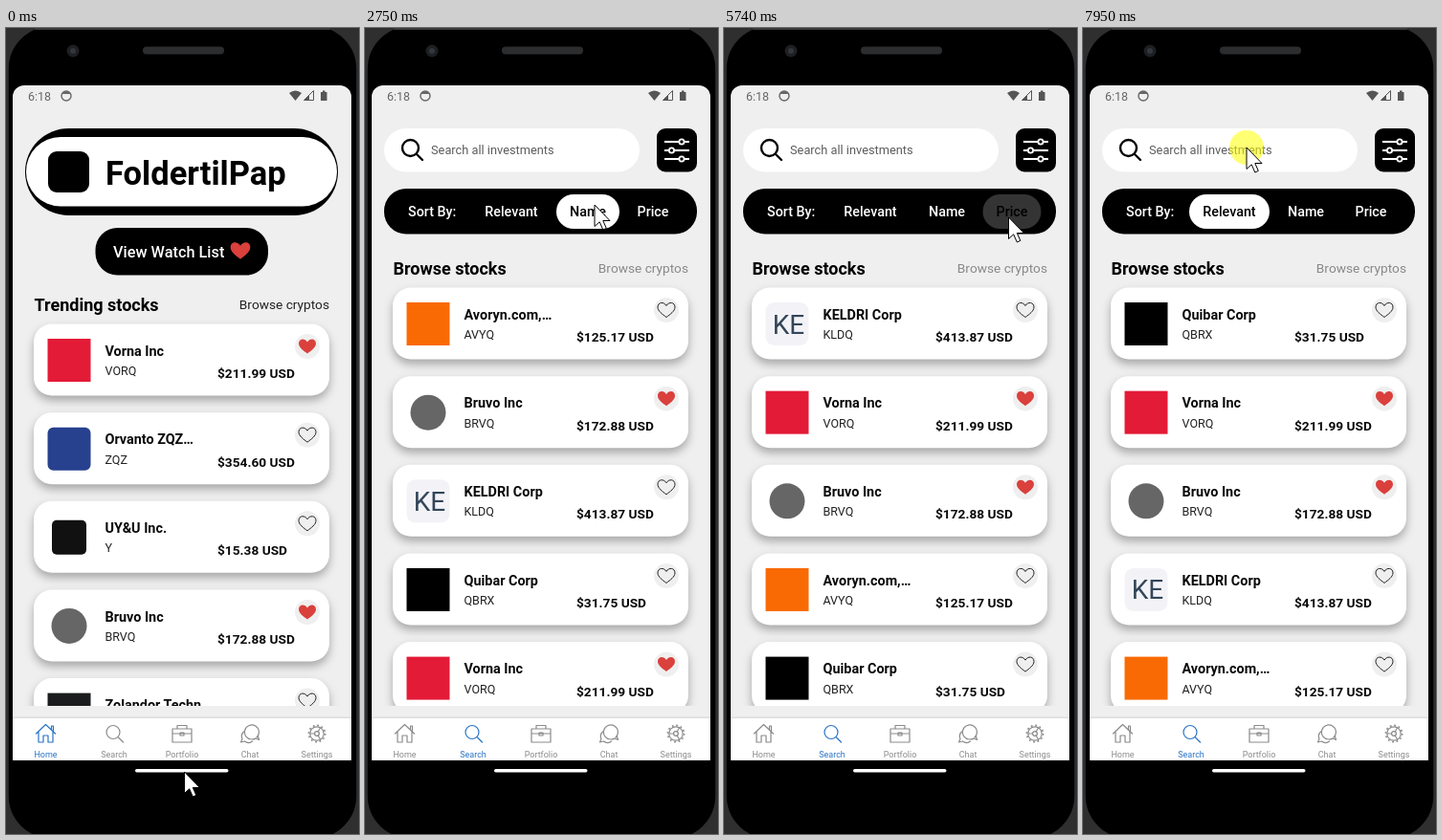
An HTML page that plays this animation: 369 by 843 pixels, repeating every 8000 ms.

```html
<!DOCTYPE html>
<html lang="en">
<head>
<meta charset="utf-8">
<title>Stock browser</title>
<style>
  html, body { margin: 0; width: 100%; height: 100%; overflow: hidden; background: #000; }
  svg { display: block; width: 369px; height: 843px; font-family: Roboto, sans-serif; }
  .card { filter: drop-shadow(0 5px 5px rgba(0, 0, 0, .3)); }
  .line { fill: none; stroke: currentColor; stroke-width: 1.2; stroke-linejoin: round; stroke-linecap: round; }
  .tab { color: #8b8b8b; }
  .tab.active { color: #2b74c6; }
  .tab text { fill: currentColor; }
</style>
</head>
<body>
<svg id="stage" viewBox="0 0 369 843"></svg>
<script>
const LOOP = 8000;
const CARD_STEP = 92.65;

const text = (x, y, size, weight, fill, value, anchor = 'start') =>
  `<text x="${x}" y="${y}" font-size="${size}" font-weight="${weight}" fill="${fill}" text-anchor="${anchor}">${value}</text>`;
const box = (x, y, w, h, r, fill, extra = '') =>
  `<rect x="${x}" y="${y}" width="${w}" height="${h}" rx="${r}" fill="${fill}" ${extra}/>`;
const circle = (x, y, r, fill, extra = '') =>
  `<circle cx="${x}" cy="${y}" r="${r}" fill="${fill}" ${extra}/>`;
const line = d => `<path class="line" d="${d}"/>`;
const heart = (x, y, liked, scale = 1) =>
  `<path transform="translate(${x} ${y}) scale(${scale})" fill="${liked ? '#da403c' : 'none'}"
    stroke="${liked ? 'none' : '#222'}" d="M0 7.5C-4 4.5-9 1-9-3C-9-8.5-2.5-9 0-4.5C2.5-9 9-8.5 9-3C9 1 4 4.5 0 7.5Z"/>`;

// Logo stand-ins, drawn relative to the card's corner
const square = (fill, r = 0) => box(14.5, 15.5, 45, 45, r, fill);
const initials = value => square('#f3f3f7', 9) + text(38.5, 48, 28, 400, '#33465a', value, 'middle');

const vorna = { name: 'Vorna Inc', ticker: 'VORQ', price: 211.99, liked: true, logo: square('#e31b37') };
const bruvo = { name: 'Bruvo Inc', ticker: 'BRVQ', price: 172.88, liked: true, logo: circle(37, 38, 18.5, '#666') };
const trending = [
  vorna,
  { name: 'Orvanto ZQZ…', ticker: 'ZQZ', price: 354.6, logo: square('#27418f', 6) },
  { name: 'UY&amp;U Inc.', ticker: 'Y', price: 15.38, logo: box(19, 20, 36, 36, 5, '#111') },
  bruvo,
  { name: 'Zolandor Techn', ticker: '', price: 14.2, logo: square('#1a1c1d') },
];
const stocks = [
  { name: 'Quibar Corp', ticker: 'QBRX', price: 31.75, logo: square('#000') },
  vorna,
  bruvo,
  { name: 'KELDRI Corp', ticker: 'KLDQ', price: 413.87, logo: initials('KE') },
  { name: 'Avoryn.com,…', ticker: 'AVYQ', price: 125.17, logo: square('#f96a04') },
];

const card = (stock, y) => `<g class="card" transform="translate(29 ${y})">
  ${box(0, 0, 309, 75, 19, '#fff')}${stock.logo}
  ${text(74.5, 33.2, 14.4, 700, '#0a0a0a', stock.name)}
  ${text(74.5, 53.5, 12.5, 400, '#222', stock.ticker)}
  ${text(192, 56.5, 13.7, 700, '#0a0a0a', `$${stock.price.toFixed(2)} USD`)}
  ${circle(286, 23.5, 13, '#efefef')}${heart(286, 23.5, stock.liked)}</g>`;
const list = (items, top) => items.map((item, i) => card(item, top + i * CARD_STEP)).join('');

const byName = (a, b) => a.name.localeCompare(b.name);
const byPrice = (a, b) => a.price - b.price;
const nameUp = [...stocks].sort(byName);
const priceUp = [...stocks].sort(byPrice);

const sortTabs = [
  { label: 'Relevant', x: 111, w: 84 },
  { label: 'Name', x: 200, w: 66 },
  { label: 'Price', x: 270.5, w: 61 },
];
const clicks = [
  { down: 600, up: 740 },
  { down: 2290, up: 2440, dim: 2310, swap: 2530, tab: 1, order: nameUp },
  { down: 3160, up: 3310, dim: 3180, swap: 3390, tab: 1, order: [...nameUp].reverse() },
  { down: 4450, up: 4590, dim: 4480, swap: 4730, tab: 2, order: priceUp },
  { down: 5470, up: 5640, dim: 5490, swap: 5730, tab: 2, order: [...priceUp].reverse() },
  { down: 6980, up: 7260, dim: 7080, swap: 7330, tab: 0, order: stocks },
];
const sorts = clicks.filter(click => click.order);
const SEARCH_OPENS = 800;

// Pointer path: time, x, y
const pointer = [
  [30, 186.5, 778], [100, 166, 768], [190, 130, 747], [270, 117, 740],
  [1100, 117, 740], [1250, 127, 680], [1450, 180, 420], [1640, 215, 265], [1760, 234, 205], [1880, 240, 185],
  [3850, 240, 185], [3960, 259, 190], [4110, 288, 196], [4220, 297.5, 198],
  [6440, 297.5, 198], [6590, 228.5, 198], [6720, 182, 198], [6940, 157, 196],
  [7380, 157, 196], [7520, 166, 155], [7660, 171, 125],
];

const navTabs = [
  ['Home', 41.5, line('M-10 0L0-9.5L10 0M-7.5-2V9H-2.5V2H2.5V9H7.5V-2M6-4V-8H8V-2')],
  ['Search', 113, line('M6-1.5A7 7 0 1 1-8-1.5A7 7 0 1 1 6-1.5M4 3.5L9.5 9')],
  ['Portfolio', 184, line('M-10-5H10V9H-10ZM-5-5V-8.5H5V-5M-10 0H10M-2-1H2V2H-2Z')],
  ['Chat', 255, line('M7 4A7.5 7.5 0 1 0 2 6Q5 6 6 5L9.5 6.5L8.5 3M-6.5-2A6.5 6.5 0 0 0-8 5.5L-9.5 9L-5.5 8A6.5 6.5 0 0 0 2.5 8')],
  ['Settings', 325, `<circle class="line" r="7.2"/><circle class="line" r="2.4"/>
    <circle r="8.6" fill="none" stroke="currentColor" stroke-width="1.6" stroke-dasharray="1.8 2.7"/>${line('M-7 0H-2.4M1.2-2L3.6-6.2M1.2 2L3.6 6.2')}`],
];

const phone = `
  <rect width="369" height="843" fill="#2f2f30"/>
  <rect x="1.5" y="-3" width="366" height="852" rx="46" fill="#000" stroke="#2d2f31" stroke-width="2.500"/>
  <path d="M30 1H339" stroke="#37393b" stroke-width="2"/>
  ${circle(70, 24, 6.5, '#1d1f22')}${circle(70, 24, 3, '#33373d')}
  ${box(143, 19.5, 85, 8, 4, '#2c2d2f')}
  <path d="M7 766V72A12 12 0 0 1 19 60H349A12 12 0 0 1 361 72V766Z" fill="#efefef"/>
  ${text(23, 75.5, 12.5, 400, '#666', '6:18')}
  ${circle(63, 71, 5, 'none', 'stroke="#666" stroke-width="1.4"')}
  <path d="M58.5 69A5 5 0 0 1 67.5 69Z" fill="#666"/>
  <path d="M296 68Q302.500 63 309 68L302.500 76Z" fill="#555"/>
  <path d="M311.500 75.500L321.500 65.500V75.500Z" fill="none" stroke="#555"/>
  <path d="M311.500 75.500L317 70V75.500Z" fill="#555"/>
  <path d="M329 67H331V65.500H333.500V67H335.500V76H329Z" fill="#555"/>`;

const homePage = `<g id="home">
  ${box(20, 105, 327, 91, 45.5, '#000')}${box(21, 114, 325, 72.5, 36, '#fff')}
  ${box(44, 129, 43, 43, 9, '#000')}
  ${text(104, 164, 34.5, 700, '#000', 'FoldertilPap')}
  ${box(93.5, 209, 180.5, 49.5, 23, '#000')}
  ${text(112, 240, 16.3, 500, '#fff', 'View Watch List')}${heart(245, 233, true, 1.15)}
  ${text(29.5, 296, 18, 700, '#000', 'Trending stocks')}
  ${text(338, 294, 13.7, 400, '#222', 'Browse cryptos', 'end')}
  <g clip-path="url(#listArea)">${list(trending, 309.5)}</g></g>`;

const knobs = [[331, 119], [320.5, 128], [331, 137]].map(([x, y]) =>
  `<path d="M313 ${y}H339" stroke="#fff" stroke-width="2.1"/>${circle(x, y, 2.6, '#000', 'stroke="#fff" stroke-width="1.8"')}`).join('');

const searchPage = `<g id="search">
  ${box(20, 105, 267, 45.5, 22.7, '#fff')}
  <g fill="none" stroke="#000" stroke-width="2.4" stroke-linecap="round"><circle cx="47.500" cy="125.500" r="8.500"/><path d="M54 132L60 138"/></g>
  ${text(69, 132.3, 12.8, 400, '#5c5c5c', 'Search all investments')}
  ${box(305, 105, 42, 45.5, 9, '#000')}${knobs}
  ${box(20, 168, 327, 47.5, 23, '#000')}
  ${text(45, 197, 14.3, 500, '#fff', 'Sort By:')}
  ${sortTabs.map(({ label, x, w }) => `<g class="sort">${box(x, 174, w, 36, 18, '#fff')}
    ${text(x + w / 2, 197, 14.3, 500, '#fff', label, 'middle')}</g>`).join('')}
  ${text(29.5, 258, 18, 700, '#000', 'Browse stocks')}
  ${text(338, 256, 13.7, 400, '#888', 'Browse cryptos', 'end')}
  <g id="results" clip-path="url(#listArea)"></g></g>`;

const navBar = `
  ${box(7, 720.5, 354, 1.5, 0, '#dedede')}${box(7, 722, 354, 44, 0, '#fff')}
  ${navTabs.map(([label, x, icon]) => `<g class="tab"><g transform="translate(${x} 738)">${icon}</g>
    <text x="${x}" y="763" font-size="9" text-anchor="middle">${label}</text></g>`).join('')}
  ${box(135, 775, 97.5, 3.5, 1.7, '#fff')}`;

const stage = document.getElementById('stage');
stage.innerHTML = `<clipPath id="listArea"><rect x="7" y="200" width="354" height="509"/></clipPath>
  ${phone}${homePage}${searchPage}${navBar}
  <g id="pointer">${circle(0, 0, 18, '#ff0', 'id="halo" fill-opacity=".55"')}
  <path d="M0 0V22.500L5.200 17.800L8.800 26L12.300 24.400L8.800 16.500H16Z" fill="#fff" stroke="#000"/></g>`;

const [home, search, results, pointerNode, halo] =
  ['home', 'search', 'results', 'pointer', 'halo'].map(id => document.getElementById(id));
const sortNodes = [...document.querySelectorAll('.sort')];
const tabNodes = [...document.querySelectorAll('.tab')];
let shownOrder;

function pointerAt(t) {
  const next = pointer.findIndex(key => key[0] > t);
  if (next === 0) return pointer[0].slice(1);
  if (next < 0) return pointer.at(-1).slice(1);
  const [t0, x0, y0] = pointer[next - 1];
  const [t1, x1, y1] = pointer[next];
  const k = (t - t0) / (t1 - t0);
  return [x0 + (x1 - x0) * k, y0 + (y1 - y0) * k];
}

// A pressed tab drops to 20 % and eases back after its list is swapped
function tabOpacity(index, t) {
  const press = sorts.findLast(s => s.tab === index && s.dim <= t);
  if (!press) return 1;
  const k = Math.min(1, Math.max(0, t - press.swap) / 220);
  return .2 + .8 * k * k * (3 - 2 * k);
}

function render(t) {
  const searching = t >= SEARCH_OPENS;
  home.style.display = searching ? 'none' : '';
  search.style.display = searching ? '' : 'none';
  tabNodes.forEach((node, i) => node.classList.toggle('active', i === Number(searching)));

  const { tab, order } = sorts.findLast(s => s.swap <= t) || { tab: 0, order: stocks };
  if (order !== shownOrder) results.innerHTML = list(shownOrder = order, 271.5);
  sortNodes.forEach((node, i) => {
    const [pill, label] = node.children;
    node.setAttribute('opacity', tabOpacity(i, t));
    pill.style.display = i === tab ? '' : 'none';
    label.setAttribute('fill', i === tab ? '#000' : '#fff');
  });

  pointerNode.setAttribute('transform', `translate(${pointerAt(t)})`);
  const pressed = clicks.some(c => t >= c.down && t < c.up) || t >= 7950;
  halo.style.display = pressed ? '' : 'none';
}

function tick() {
  render(performance.now() % LOOP);
  requestAnimationFrame(tick);
}
tick();
</script>
</body>
</html>
```
